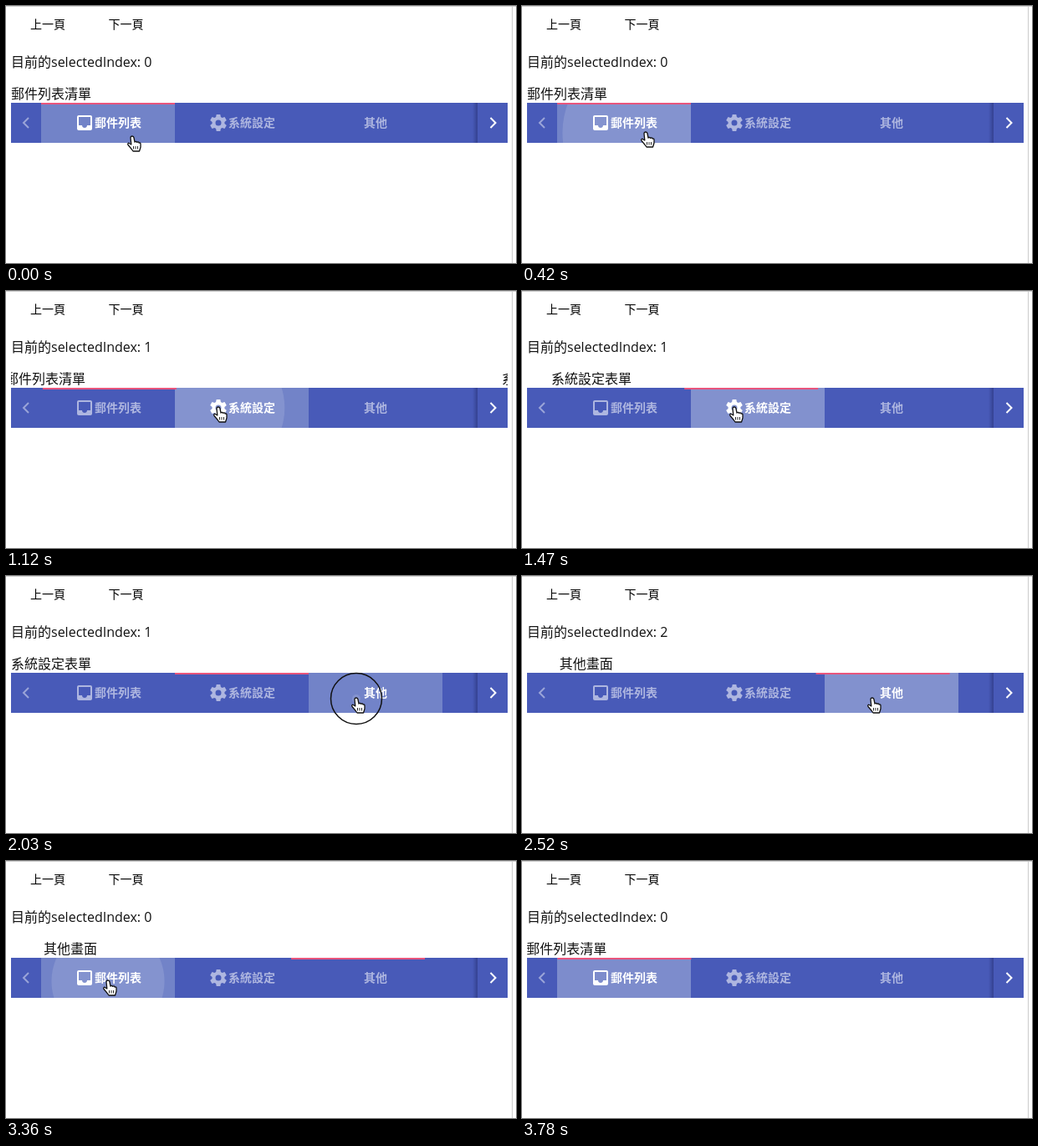
Write an HTML page with a canvas that moves like this. It is 610 by 308 pixels and loops after 3990 ms.

```html
<!DOCTYPE html>
<html lang="zh-Hant">
<head>
<meta charset="utf-8">
<style>
  html, body { margin: 0; width: 610px; height: 308px; overflow: hidden; background: #fff; }
  canvas { display: block; }
</style>
</head>
<body>
<canvas width="610" height="308"></canvas>
<script>
const ctx = document.querySelector('canvas').getContext('2d');
const LOOP = 3990, STEP = 70, LAST = 3780;
const LEFT = 6, TOP = 116, WIDTH = 594, HEIGHT = 48, TAB = 160, TABS_LEFT = 42;
const PRESS = 131, SLIDE = 515, RIPPLE = 450, FADE = 400;
const BLUE = '#485ab8', FOCUS = '#7283c8', PINK = '#e8557d';

const panes = ['郵件列表清單', '系統設定表單', '其他畫面'];
const clicks = [
  { down: 160, x: 148, y: 152, from: 0, to: 0 },
  { down: 957, x: 254, y: 140, from: 0, to: 1 },
  { down: 2025, x: 419, y: 147, from: 1, to: 2 },
  { down: 3159, x: 122, y: 144, from: 2, to: 0 }
];
// Pointer stops: time, x, y
const pointer = [
  [0, 151, 157], [140, 148, 152], [560, 148, 152], [910, 254, 140], [1610, 254, 140],
  [1960, 419, 147], [2730, 419, 147], [2980, 122, 144], [3430, 122, 144], [3710, 150, 325]
];
const inbox = new Path2D('M19 3H5C3.9 3 3 3.9 3 5V19C3 20.1 3.9 21 5 21H19C20.1 21 21 20.1 21 19V5C21 3.9 20.1 3 19 3ZM19 15H15C15 16.7 13.7 18 12 18S9 16.7 9 15H5V5H19Z');
const hand = new Path2D('M-2 1Q-2-1 0-1Q1.8-1 2 1L3 6Q4.5 4.8 5.5 6.3Q7.5 5.3 8 7Q10 6.5 10 8.5V12Q9.5 14 8.5 17H1Q-1 14-5 9.5Q-6 7.5-4 7.2L-1.2 9Z');
const handLines = new Path2D('M1.5 11V14.5M4 11V14.5M6.5 11V14.5');
const arrow = new Path2D('M0 0V15L3.5 11.8L6 17.5L8.5 16.4L6 11H10.8Z');
const gear = new Path2D();
for (let i = 0; i < 6; i++) {
  const c = Math.cos(i * Math.PI / 3), s = Math.sin(i * Math.PI / 3);
  for (const [x, y] of [[-2.9, -6.9], [-2.3, -10], [2.3, -10], [2.9, -6.9]])
    gear.lineTo(12 + x * c - y * s, 12 + x * s + y * c);
}
gear.closePath();
gear.moveTo(15.5, 12);
gear.arc(12, 12, 3.5, 0, 7);

const clamp = v => Math.max(0, Math.min(1, v));
const smooth = s => s * s * (3 - 2 * s);

// cubic-bezier(x1, 0, x2, 1)
function ease(x1, x2, v) {
  v = clamp(v);
  let lo = 0, hi = 1;
  for (let i = 0; i < 25; i++) {
    const s = (lo + hi) / 2, r = 1 - s;
    if (3 * r * r * s * x1 + 3 * r * s * s * x2 + s * s * s < v) lo = s; else hi = s;
  }
  return smooth(lo);
}

function rect(x, y, w, h, color) {
  ctx.fillStyle = color;
  ctx.fillRect(x, y, w, h);
}

function text(str, x, y, size, weight, color) {
  ctx.font = `${weight} ${size}px "Open Sans", "Noto Sans CJK TC", "Noto Sans CJK", sans-serif`;
  ctx.fillStyle = color;
  ctx.fillText(str, x, y);
}

function clipped(x, y, w, h, draw) {
  ctx.save();
  ctx.beginPath();
  ctx.rect(x, y, w, h);
  ctx.clip();
  draw();
  ctx.restore();
}

function at(x, y, draw) {
  ctx.save();
  ctx.translate(x, y);
  draw();
  ctx.restore();
}

function outline(path, color, width) {
  ctx.strokeStyle = color;
  ctx.lineWidth = width;
  ctx.stroke(path);
}

function drawRipple({ down, x, y, to }, t) {
  const age = t - down;
  if (age < 0 || age > RIPPLE + FADE) return;
  const left = TABS_LEFT + to * TAB;
  const reach = Math.hypot(Math.max(x - left, left + TAB - x), Math.max(y - TOP, TOP + HEIGHT - y));
  clipped(left, TOP, TAB, HEIGHT, () => {
    ctx.fillStyle = `rgba(255,255,255,${0.13 * (1 - clamp((age - RIPPLE) / FADE))})`;
    ctx.beginPath();
    ctx.arc(x, y, reach * ease(0, 0.2, age / RIPPLE), 0, 7);
    ctx.fill();
  });
}

function drawTabs(focus) {
  const labels = [['郵件列表', 106, inbox], ['系統設定', 266, gear], ['其他', 428]];
  labels.forEach(([label, x, icon], i) => {
    ctx.globalAlpha = i === focus ? 1 : 0.56;
    text(label, x, 145, 14, 600, '#fff');
    if (icon) at(x - 24, 128, () => ctx.fill(icon, 'evenodd'));
  });
  ctx.globalAlpha = 1;
}

function drawPointer(t) {
  const i = pointer.findIndex(p => p[0] > t);
  if (i < 0) return;
  const [t0, x0, y0] = pointer[i - 1], [t1, x1, y1] = pointer[i];
  const k = smooth((t - t0) / (t1 - t0));
  const y = y0 + (y1 - y0) * k;
  at(x0 + (x1 - x0) * k, y, () => {
    ctx.lineJoin = 'round';
    if (y < TOP + HEIGHT) {
      ctx.fillStyle = '#fff';
      ctx.fill(hand);
      outline(hand, '#111', 1.3);
      outline(handLines, '#111', 0.9);
    } else {
      outline(arrow, '#fff', 2);
      ctx.fillStyle = '#000';
      ctx.fill(arrow);
    }
  });
}

function draw(t) {
  const press = clicks.filter(c => c.down <= t).pop();
  const click = clicks.filter(c => c.down + PRESS <= t).pop() || clicks[0];
  const { from, to } = click;
  const p = ease(0.35, 0.25, (t - click.down - PRESS) / SLIDE);
  const focus = press ? press.to : 0;

  rect(0, 0, 610, 308, '#fff');
  rect(0, 0, 610, 1, '#d2d2d2');
  rect(605, 0, 1, 308, '#cbcbcb');
  text('上一頁', 29, 27, 14, 500, '#000');
  text('下一頁', 122.5, 27, 14, 500, '#000');
  text('目前的selectedIndex: ' + to, LEFT, 73, 16, 400, '#111');

  clipped(LEFT, 92, WIDTH, 24, () => {
    const dir = Math.sign(to - from);
    if (dir) text(panes[from], LEFT - dir * WIDTH * p, 111, 16, 400, '#111');
    text(panes[to], LEFT + dir * WIDTH * (1 - p), 111, 16, 400, '#111');
  });

  rect(LEFT, TOP, WIDTH, HEIGHT, BLUE);
  rect(TABS_LEFT + focus * TAB, TOP, TAB, HEIGHT, FOCUS);
  clicks.forEach(c => drawRipple(c, t));
  rect(TABS_LEFT + (from + (to - from) * p) * TAB, TOP, TAB, 2, PINK);
  drawTabs(focus);

  const shade = ctx.createLinearGradient(558, 0, 564, 0);
  shade.addColorStop(0, 'rgba(0,0,40,0)');
  shade.addColorStop(1, 'rgba(0,0,40,.28)');
  rect(558, TOP, 6, HEIGHT, shade);
  outline(new Path2D('M27 134l-6 6l6 6'), 'rgba(255,255,255,.45)', 2);
  outline(new Path2D('M579.5 134l6 6l-6 6'), '#fff', 2);

  if (press && t < press.down + PRESS) {
    const ring = new Path2D();
    ring.arc(press.x, press.y, 30.5, 0, 7);
    outline(ring, '#111', 1.5);
  }
  drawPointer(t);
}

function tick() {
  const t = performance.now() % LOOP;
  draw(Math.min(Math.floor(t / STEP) * STEP, LAST));
  requestAnimationFrame(tick);
}
tick();
</script>
</body>
</html>
```
